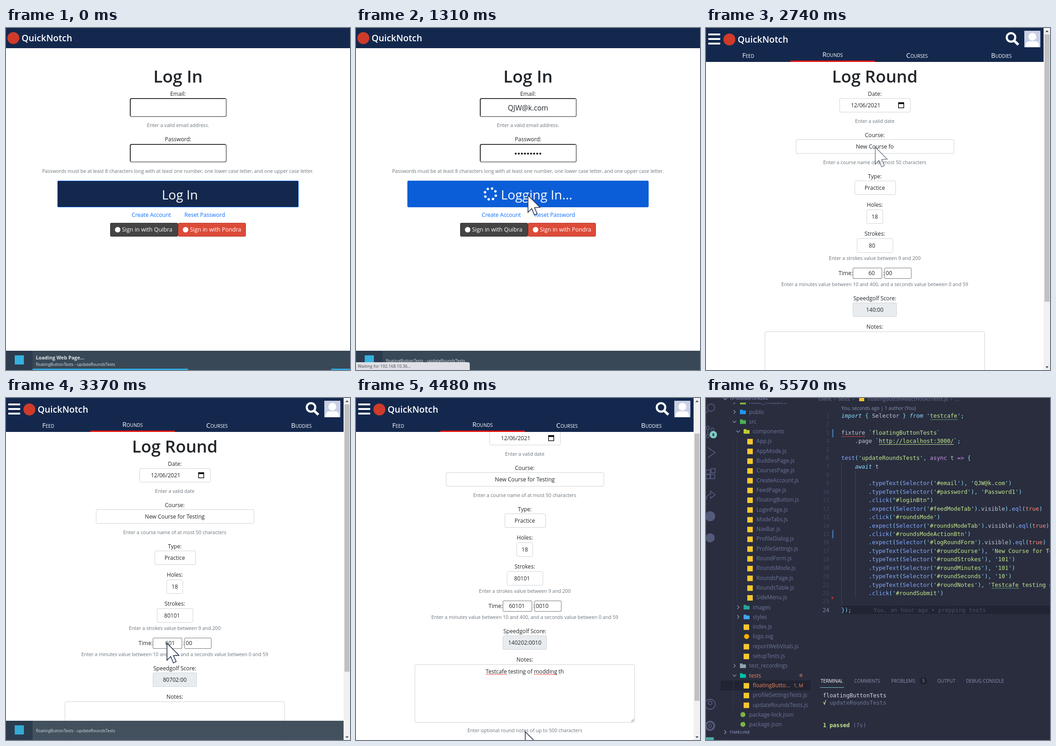
Animation, 750 px wide and 746 px high, one loop 5.63 s. Source, as an HTML page with a canvas:

```html
<!DOCTYPE html>
<html lang="en">
<head>
<meta charset="utf-8">
<title>Web test run</title>
<style>
  html, body { margin: 0; width: 100%; height: 100%; overflow: hidden; background: #fff; }
  canvas { display: block; }
</style>
</head>
<body>
<canvas id="stage" width="750" height="746"></canvas>
<script>
const ctx = document.getElementById('stage').getContext('2d');
const LOOP = 5630, STEP = 68.7;
const SANS = '"Open Sans", "Noto Sans", sans-serif';
const MONO = '"DejaVu Sans Mono", "Liberation Mono", monospace';
const INK = '#212529', HINT = '#6c757d', NAVY = '#14284d', BRAND = '#cf3b2b', LINK = '#0d6efd';
const APP = 'QuickNotch', EMAIL = 'QJW@k.com', COURSE = 'New Course for Testing';
const NOTES = 'Testcafe testing of modding the round';

// ---- drawing helpers; y is the middle of the capitals ----
function text(str, x, y, size, { color = INK, align = 'center', weight = 400, family = SANS, style = '' } = {}) {
  ctx.font = `${style} ${weight} ${size}px ${family}`;
  ctx.fillStyle = color;
  ctx.textAlign = align;
  ctx.fillText(str, x, y + size * 0.36);
  return ctx.measureText(str).width;
}
const left = (str, x, y, size, color = INK, more = {}) => text(str, x, y, size, { color, align: 'left', ...more });
const label = (str, y, x = 368) => text(str, x, y, 12.1);
const hint = (str, y, x = 368) => text(str, x, y, 10.63, { color: HINT });

function rect(x, y, w, h, color) {
  ctx.fillStyle = color;
  ctx.fillRect(x, y, w, h);
}
function box(x1, y1, x2, y2, { fill = '#fff', stroke = '#ced4da', width = 1, radius = 3 } = {}) {
  ctx.beginPath();
  ctx.roundRect(x1, y1, x2 - x1, y2 - y1, radius);
  ctx.fillStyle = fill;
  ctx.fill();
  ctx.beginPath();
  ctx.roundRect(x1 + width / 2, y1 + width / 2, x2 - x1 - width, y2 - y1 - width, Math.max(0, radius - width / 2));
  ctx.strokeStyle = stroke;
  ctx.lineWidth = width;
  ctx.stroke();
}
function disc(x, y, r, color) {
  ctx.beginPath();
  ctx.arc(x, y, r, 0, 7);
  ctx.fillStyle = color;
  ctx.fill();
}
function ring(x, y, r, color, width) {
  ctx.beginPath();
  ctx.arc(x, y, r, 0, 7);
  ctx.strokeStyle = color;
  ctx.lineWidth = width;
  ctx.stroke();
}
function path(points, { fill, stroke, width = 1 }) {
  ctx.beginPath();
  points.forEach(([x, y]) => ctx.lineTo(x, y));
  if (fill) { ctx.closePath(); ctx.fillStyle = fill; ctx.fill(); }
  if (stroke) { ctx.strokeStyle = stroke; ctx.lineWidth = width; ctx.stroke(); }
}
function squiggle(x, y, width, color) {
  const points = [];
  for (let i = 0; i <= width; i += 2) points.push([x + i, y + (i % 4 ? 1 : -1)]);
  path(points, { stroke: color });
}

// ---- timing helpers ----
function track(keys, t) {
  const next = keys.findIndex(key => key[0] > t);
  if (next === 0) return keys[0].slice(1);
  if (next < 0) return keys[keys.length - 1].slice(1);
  const a = keys[next - 1], b = keys[next], k = (t - a[0]) / (b[0] - a[0]);
  return a.slice(1).map((v, i) => v + (b[i + 1] - v) * k);
}
const typed = (str, t, start, perChar) => str.slice(0, Math.max(0, Math.floor((t - start) / perChar)));

const CURSOR = [[70, 375, 173], [690, 375, 173], [800, 375, 273], [1060, 375, 273], [1190, 375, 365],
  [1930, 375, 365], [2070, 281, 59], [2440, 281, 59], [2500, 700, 722], [2600, 369, 260], [2890, 369, 260],
  [3050, 368, 474], [3180, 368, 474], [3300, 351, 535], [3460, 351, 535], [3600, 418, 535], [3800, 418, 535],
  [3900, 369, 728], [4800, 369, 728], [5050, 207, 702]];
const STATUS_ALPHA = [[0, 1], [2480, 1], [2610, 0], [3090, 0], [3300, 0.95], [3910, 0.95], [3984, 0.85],
  [4250, 0], [5020, 0], [5084, 0.03], [5230, 0.5], [5400, 1]];
const SCROLL = [[3820, 0], [3880, 81], [4640, 81], [4750, 173]];

// ---- web pages ----
function inputBox(y1, y2) {
  box(270, y1, 481, y2, { stroke: '#666', width: 1.6, radius: 4 });
  path([[270.8, y2 - 3], [270.8, y1 + 3], [273, y1 + 0.8], [478, y1 + 0.8]], { stroke: '#111', width: 1.6 });
}

function loginPage(t) {
  rect(0, 0, 750, 44, NAVY);
  disc(16, 22, 13, BRAND);
  left(APP, 34, 22, 19.4, '#fff', { weight: 600 });
  text('Log In', 375, 106, 37, { weight: 600 });
  label('Email:', 144, 375);
  inputBox(153, 194);
  text(typed(EMAIL, t, 250, 40), 375, 174, 15.5);
  hint('Enter a valid email address.', 212, 375);
  label('Password:', 243, 375);
  inputBox(253, 293);
  const dots = typed('Password1', t, 790, 26).length;
  for (let i = 0; i < dots; i++) disc(375 + (i - (dots - 1) / 2) * 6.7, 274, 2.1, '#000');
  hint('Passwords must be at least 8 characters long with at least one number, one lower case letter, and one upper case letter.', 312, 375);

  const busy = t >= 1240;
  box(112, 333, 638, 391, { fill: busy ? '#0b5ed7' : NAVY, stroke: busy ? '#0b5ed7' : LINK });
  if (busy) {
    for (let i = 0; i < 8; i++) {
      const a = i * Math.PI / 4 + t / 160;
      disc(293 + 12.3 * Math.cos(a), 362 + 12.3 * Math.sin(a), 2.7, '#fff');
    }
    left('Logging In...', 316, 364, 27.9, '#fff');
  } else {
    text('Log In', 379, 364, 27.9, { color: '#fff' });
  }
  left('Create Account', 274, 408, 12.1, LINK);
  left('Reset Password', 389, 408, 12.1, LINK);
  [['Quibra', 227, '#444'], ['Pondra', 375, '#dd4b39']].forEach(([name, x, fill]) => {
    box(x, 425, x + 148, 455, { fill, stroke: 'rgba(0,0,0,.2)' });
    disc(x + 16.5, 440, 6, '#fff');
    left('Sign in with ' + name, x + 26, 440, 12.45, '#fff');
  });
}

function navBar(width, selected) {
  rect(0, 0, width, 74, NAVY);
  [12, 22, 32].forEach(y => rect(5, y, 26, 4, '#fff'));
  disc(51, 25, 13, BRAND);
  left(APP, 69, 25, 19.4, '#fff', { weight: 600 });
  ring(width - 71, 20.5, 9.3, '#fff', 4.5);
  path([[width - 64, 28], [width - 55, 36.5]], { stroke: '#fff', width: 5.5 });
  ctx.save();
  ctx.beginPath();
  ctx.rect(width - 42, 6, 35, 36);
  ctx.clip();
  rect(width - 42, 6, 35, 36, '#c9d0e6');
  disc(width - 24.5, 19, 8.5, '#fff');
  ctx.beginPath();
  ctx.roundRect(width - 39, 29, 29, 20, 8);
  ctx.fill();
  ctx.restore();
  ['Feed', 'Rounds', 'Courses', 'Buddies'].forEach((name, i) => {
    const on = i === selected;
    text(name, width * (i + 0.5) / 4, on ? 58 : 59.5, 14.6, { color: '#fff', style: 'small-caps' });
    if (on) rect(width * i / 4, 71, width / 4, 3, '#e5140f');
  });
}

function feedPage() {
  navBar(750, 0);
  text('Activity Feed', 375, 106, 36.5, { weight: 600 });
  text('This page is under construction.', 375, 150, 18.3);
}

function roundsPage() {
  navBar(750, 1);
  text('Rounds', 375, 106, 36.5, { weight: 600 });
}

function roundForm(t) {
  const [scroll] = track(SCROLL, t);
  const strokes = '80' + typed('101', t, 3070, 30);
  const minutes = '60' + typed('101', t, 3310, 30);
  const seconds = '00' + typed('10', t, 3620, 45);
  const notes = typed(NOTES, t, 3925, 18);
  const value = (str, x, y) => text(str, x, y, 12.1);

  ctx.save();
  ctx.translate(0, -Math.round(scroll));
  text('Log Round', 368, 106, 36.5, { weight: 600 });
  label('Date:', 144);
  box(291, 153, 446, 184);
  value('12/06/2021', 348, 169);
  box(419, 163, 432, 175, { stroke: '#111', width: 1.5, radius: 1 });
  rect(419, 162, 13, 4, '#111');
  hint('Enter a valid date', 203);
  label('Course:', 234);
  box(196, 243, 541, 274);
  value(typed(COURSE, t, 2600, 11), 368, 259);
  hint('Enter a course name of at most 50 characters', 293);
  label('Type:', 324);
  box(324, 333, 414, 364);
  value('Practice', 368, 349);
  label('Holes:', 386);
  box(350, 396, 386, 427);
  value('18', 368, 412);
  label('Strokes:', 449);
  box(329, 459, 408, 490);
  value(strokes, 362, 475);
  hint('Enter a strokes value between 9 and 200', 502);
  left('Time:', 289, 535, 12.1);
  const dark = { stroke: '#767676', radius: 2 };
  box(320, 523, 384, 547, dark);
  text(minutes, 368, 535, 12.1, { align: 'right' });
  left(':', 386, 535, 12.1);
  box(389, 523, 448, 547, dark);
  left(seconds, 392, 535, 12.1);
  hint('Enter a minutes value between 10 and 400, and a seconds value between 0 and 59', 559);
  label('Speedgolf Score:', 590);
  box(320, 599, 416, 630, { fill: '#e9ecef' });
  value(`${+strokes + +minutes}:${seconds}`, 368, 615);
  label('Notes:', 652);
  box(128, 662, 608, 789);
  path([[600, 787], [606, 781]], { stroke: '#666' });
  path([[603, 787], [606, 784]], { stroke: '#666' });
  const start = 368 - value(notes, 368, 678) / 2;
  ['Testcafe', 'modding'].forEach(word => {
    const at = NOTES.indexOf(word);
    if (notes.length <= at + word.length) return;
    squiggle(start + ctx.measureText(NOTES.slice(0, at)).width, 684, ctx.measureText(word).width, '#e33');
  });
  hint('Enter optional round notes of up to 500 characters', 806);

  const white = '#fff';
  box(118, 827, 295, 919, { fill: NAVY, stroke: '#555', width: 2, radius: 0 });
  box(165, 841, 191, 866, { fill: white, stroke: white, radius: 2 });
  rect(165, 847, 26, 2, NAVY);
  [171, 182].forEach(x => rect(x, 837, 4, 5, white));
  left('Log', 200, 854, 26.9, white);
  left('Round', 165, 897, 26.9, white);
  box(442, 827, 619, 919, { fill: '#f00', stroke: '#555', width: 2, radius: 0 });
  box(470, 862, 498, 886, { fill: white, stroke: white });
  path([[479, 869], [489, 879]], { stroke: '#f00', width: 4 });
  path([[489, 869], [479, 879]], { stroke: '#f00', width: 4 });
  left('Cancel', 506, 875, 27, white);
  ctx.restore();

  navBar(736, 1);
  rect(736, 0, 14, 746, '#f1f1f1');
  rect(738, 14 + scroll * 0.785, 11, 583, '#c1c1c1');
  path([[740, 9], [747, 9], [743.5, 5]], { fill: '#505050' });
  path([[740, 738], [747, 738], [743.5, 742]], { fill: '#505050' });
}

function statusBar(t, width) {
  ctx.save();
  ctx.globalAlpha = track(STATUS_ALPHA, t)[0];
  rect(0, 704, width, 42, '#394856');
  rect(0, 704, 58, 42, '#2c3b4e');
  rect(19, 714, 20, 20, '#35b0de');
  const loading = t < 230;
  if (loading) {
    left('Loading Web Page...', 65, 719, 10.7, '#dfe2e5', { weight: 700 });
    const span = width - 58, head = (651 + t * 0.7) % span;
    rect(58 + head, 743, Math.min(380, span - head), 3, '#2fa8dd');
    rect(58, 743, Math.max(0, head + 380 - span), 3, '#2fa8dd');
  }
  left('floatingButtonTests - updateRoundsTests', 65, loading ? 733.5 : 725.5, 9.05, '#dfe2e5');
  ctx.restore();
  if (t >= 1240 && t < 1950) {
    ctx.beginPath();
    ctx.roundRect(0, 729, 248, 18, [0, 4, 0, 0]);
    ctx.fillStyle = '#dfe0e6';
    ctx.fill();
    left('Waiting for 192.168.10.36...', 4, 738, 9.15, '#45484d');
  }
}

function pointer(t) {
  if (t < 70 || (t > 1500 && t < 1940)) return;
  const [x, y] = track(CURSOR, t);
  ctx.save();
  ctx.translate(x, y);
  ctx.globalAlpha = t > 2540 && t < 2890 ? 0.6 : 1;
  path([[0, 0], [0, 37], [8, 29], [14, 43], [20, 40], [14, 27], [26, 26], [0, 0]],
    { fill: '#fff', stroke: '#25354f', width: 1.6 });
  ctx.restore();
}

// ---- code editor ----
const MUTED = '#6f769b', FAINT = '#3f4560', GREEN = '#c3e88d', CYAN = '#89ddff', ORANGE = '#f4845f', JS = '#f7c72f';
const components = ['App', 'AppMode', 'BuddiesPage', 'CoursesPage', 'CreateAccount', 'FeedPage', 'FloatingButton',
  'LoginPage', 'ModeTabs', 'NavBar', 'ProfileDialog', 'ProfileSettings', 'RoundForm', 'RoundsMode', 'RoundsPage',
  'RoundsTable', 'SideMenu'];
// [depth, name, icon colour, folder state]
const TREE = [
  [0, 'node_modules', '#7cb342', '>'], [0, 'public', '#2196f3', '>'], [0, 'src', '#4caf50', 'v'],
  [1, 'components', '#c0ca33', 'v'], ...components.map(name => [2, name + '.js', JS]),
  [1, 'images', '#26a69a', '>'], [1, 'styles', '#42a5f5', '>'], [1, 'index.js', JS], [1, 'logo.svg', '#ffb300', 'o'],
  [1, 'reportWebVitals.js', JS], [1, 'setupTests.js', JS], [0, 'test_recordings', '#90a4ae', '>'],
  [0, 'tests', '#00bfa5', 'v'], [1, 'floatingButto...', JS], [1, 'profileSettingsTests.js', JS],
  [1, 'updateRoundsTests.js', JS], [0, 'package-lock.json', '#7cb342', 'o'], [0, 'package.json', '#7cb342', 'o']];

const type = (id, value) => `        .typeText(Selector('#${id}'), '${value}')`;
const click = id => `        .click('#${id}')`;
const expect = id => `        .expect(Selector('#${id}').visible).eql(true)`;
const CODE = ["import { Selector } from 'testcafe';", '', 'fixture `floatingButtonTests`',
  '    .page `http:\/\/localhost:3000/`;', '', "test('updateRoundsTests', async t => {", '    await t', '',
  type('email', EMAIL), type('password', 'Password1'), '        .click("#loginBtn")', expect('feedModeTab'),
  click('roundsMode'), expect('roundsModeTab'), click('roundsModeActionBtn'), expect('logRoundForm'),
  type('roundCourse', COURSE), type('roundStrokes', '101'), type('roundMinutes', '101'), type('roundSeconds', '10'),
  type('roundNotes', NOTES), click('roundSubmit'), '', '});'];
// string, italic keyword, storage, constant, call, name, punctuation
const TOKENS = /(['"`][^'"`]*['"`])|\b(import|from|await)\b|(async|=>)|\b(true)\b|(\w+)(?=\()|(\w+)|([^\w\s'"`]+)/g;
const TOKEN_COLORS = [GREEN, CYAN, '#c792ea', '#ff8b7a', '#82aaff', '#bfc7d5', CYAN];

function codeLine(line, x, y) {
  const size = 12.35, cell = size * 0.602;
  for (const m of line.matchAll(TOKENS)) {
    const kind = m.slice(1).findIndex(Boolean), at = x + m.index * cell, word = m[0];
    const draw = (str, color) => left(str, at, y, size, color, { family: MONO, style: kind === 1 ? 'italic' : '' });
    if (kind === 0) {
      draw(' ' + word.slice(1, -1), GREEN);
      draw(word[0] + ' '.repeat(word.length - 2) + word[0], CYAN);
    } else {
      draw(word, TOKEN_COLORS[kind]);
    }
    if (word.includes('localhost')) rect(at + cell, y + 7, cell * (word.length - 2), 1, GREEN);
  }
}

function chevron(x, y, open) {
  path(open ? [[x - 4, y - 2], [x, y + 2], [x + 4, y - 2]] : [[x - 2, y - 4], [x + 2, y], [x - 2, y + 4]],
    { stroke: '#9aa0bd', width: 1.2 });
}

function sideBar() {
  rect(32, 616, 196, 22, '#212432');
  [[66, 84, 580], [74, 84, 445], [66, 616, 680]].forEach(([x, y1, y2]) => rect(x - 7, y1, 1, y2 - y1, '#343950'));
  TREE.forEach(([depth, name, color, state], i) => {
    const y = 9 + i * 21.3, x = 81 + depth * 8;
    const changed = name === 'tests' || name.startsWith('floatingB');
    if (state === '>' || state === 'v') {
      chevron(x - 19, y, state === 'v');
      rect(x - 7, y - 5, 6, 3, color);
      rect(x - 7, y - 3, 13, 8, color);
    } else if (state === 'o') disc(x - 0.5, y, 5.5, color);
    else rect(x - 7, y - 5, 12, 12, color);
    left(name, x + 13, y, 11.8, changed ? ORANGE : MUTED);
  });
  left('1, M', 191, 627, 10.5, ORANGE);
  disc(207, 605, 3.5, '#7b5550');
  // Section headers cover the ends of the scrolled tree.
  rect(23, 0, 205, 10, '#292d3e');
  rect(23, 719, 205, 27, '#292d3e');
  chevron(42, 2, true);
  left('TP-ANIME-IS-REAL', 51, 1, 9.6, MUTED, { weight: 700 });
  chevron(42, 729, false);
  left('TIMELINE', 51, 729, 9.6, MUTED, { weight: 700 });
}

function activityBar() {
  const c = '#535a7a', line = { stroke: c, width: 1.8 };
  ring(11, 21, 8, c, 1.8);
  path([[5, 27], [-2, 35]], line);
  [[4, 65], [14, 69], [4, 83]].forEach(([x, y]) => ring(x, y, 3.5, c, 1.8));
  path([[4, 69], [4, 79]], line);
  disc(16, 80, 8, '#80cbc4');
  text('8', 16, 80, 9, { color: '#20232f', weight: 700 });
  path([[4, 108], [20, 119], [4, 130]], line);
  [[0, 157], [0, 167], [10, 167], [11, 154]].forEach(([x, y]) => { ctx.lineWidth = 1.8; ctx.strokeStyle = c; ctx.strokeRect(x, y, 9, 9); });
  path([[0, 222], [3, 213], [10, 209], [10, 203], [20, 211], [10, 219], [10, 214]], line);
  disc(9, 258, 11, c);
  disc(9, 305, 10, c);
  ring(9, 668, 11, c, 1.8);
  ring(9, 665, 4, c, 1.8);
  ring(9, 715, 9, c, 4);
  ring(9, 715, 3, c, 1.8);
  rect(0, 740, 17, 6, '#4fa9a5');
}

function editor() {
  rect(0, 0, 750, 746, '#292d3e');
  activityBar();
  sideBar();
  left('client  ›  tests  ›', 245, 2, 11.3, MUTED);
  rect(334, -3, 11, 10, JS);
  left('floatingButtonReactHooksTests.js  ›  ...', 352, 2, 11.3, MUTED);
  left('You, seconds ago | 1 author (You)', 295, 22, 10.4, '#8b91ad');
  rect(296, 453, 454, 18, '#212432');
  rect(295, 140, 1, 313, '#3f4560');
  rect(325, 158, 1, 277, '#3f4560');
  [68, 288].forEach(y => rect(275, y, 3, 18, '#3d6d9e'));
  path([[274, 432], [279, 436], [274, 440]], { fill: '#a0343c' });
  CODE.forEach((line, i) => {
    const y = 38.5 + i * 18.43;
    text(i + 1, 269, y, 12.35, { family: MONO, align: 'right', color: i === 23 ? '#8087a8' : FAINT });
    codeLine(line, 295, y);
  });
  squiggle(295, 84, 52, '#d04545');
  squiggle(489, 47, 60, '#5f9e6e');
  squiggle(623, 415, 60, '#5f9e6e');
  left('You, an hour ago • prepping tests', 365, 462.5, 12.35, '#4b5068', { family: MONO });

  [['TERMINAL', 250], ['COMMENTS', 323], ['PROBLEMS', 404], ['OUTPUT', 504], ['DEBUG CONSOLE', 567]].forEach(([name, x], i) =>
    left(name, x, 617, 10.1, i ? '#8b91b0' : '#fff'));
  rect(249, 631, 52, 1, '#80cbc4');
  disc(474, 617, 8, '#20232f');
  text('5', 474, 617, 9, { color: '#a6accd' });
  const mono = { family: MONO }, bold = { family: MONO, weight: 700 };
  left('floatingButtonTests', 255, 649, 12.1, '#d5d9e8', mono);
  left('√', 255, 665, 12.1, GREEN, bold);
  left('updateRoundsTests', 269.5, 665, 12.1, MUTED, mono);
  left('1 passed', 255, 714, 12.1, GREEN, bold);
  left('(7s)', 320.5, 714, 12.1, MUTED, mono);
}

// ---- scenes ----
function draw(now) {
  const t = Math.floor((now % LOOP + 8) / STEP) * STEP;
  if (t >= 5400) {
    editor();
  } else {
    const onForm = t >= 2540 && t < 5200;
    rect(0, 0, 750, 746, '#fff');
    if (t < 1560) loginPage(t);
    else if (t < 2090) feedPage();
    else if (onForm) roundForm(t);
    else roundsPage();
    statusBar(t, onForm ? 736 : 750);
    pointer(t);
  }
}

const begin = performance.now();
(function frame() {
  draw(performance.now() - begin);
  requestAnimationFrame(frame);
})();
</script>
</body>
</html>
```
